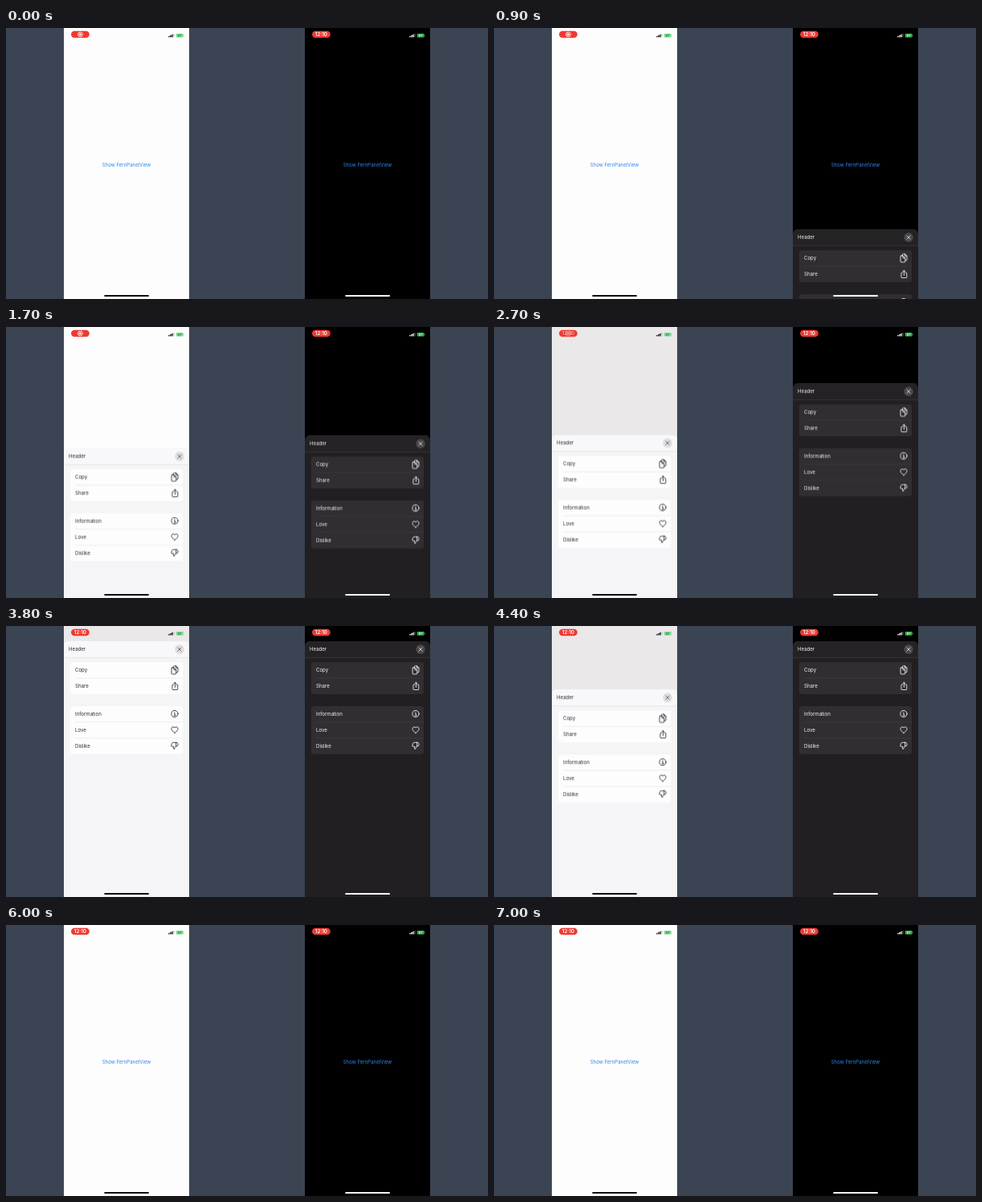
Write an HTML page that moves like this. It is 600 px wide and 338 px high and loops after 7100 ms.

```html
<!DOCTYPE html>
<html lang="en">
<head>
<meta charset="utf-8">
<title>Half-height sheet, light and dark</title>
<style>
  html, body { margin: 0; width: 100%; height: 100%; overflow: hidden; background: #3b4452; }
  svg { display: block; width: 600px; height: 338px; }
  text { font: 6.1px Inter, "Liberation Sans", sans-serif; fill: var(--text); }

  .light {
    --screen: #fefdfe; --ink: #0c0c0e; --text: #2b2b2e; --sheet: #f5f4f7; --header: #f8f7f9;
    --card: #fefdfe; --line: #dfdee2; --close: #dedde0; --cross: #65646a; --weak: #c4c4c8;
    --cell: #7ddc94; --charge: #23803c;
  }
  .dark {
    --screen: #000; --ink: #fff; --text: #f6f5f7; --sheet: #221f22; --header: #252225;
    --card: #302e32; --line: #434145; --close: #4a484c; --cross: #d2d1d4; --weak: #55555a;
    --cell: #38a94f; --charge: #d9f5df;
  }

  .screen { fill: var(--screen); }
  .sheet { fill: var(--sheet); }
  .header { fill: var(--header); }
  .card { fill: var(--card); }
  .rule { stroke: var(--line); stroke-width: .6; }
  .ink { fill: var(--ink); }
  .icon { fill: none; stroke: var(--text); stroke-width: .85; stroke-linecap: round; stroke-linejoin: round; }
  .button { fill: #2f86ec; text-anchor: middle; }
  .pill { fill: #ee3a33; }
  .clock { font-size: 6.2px; font-weight: 600; fill: #fff; text-anchor: middle; }

  .move, .dim, .clock.late, .rec, .press { animation: 7.1s linear infinite; }
  .light .move { animation-name: light-sheet; }
  .dark .move { animation-name: dark-sheet; }
  .dim { fill: #ebe8ea; animation-name: dim; }
  .clock.late { animation-name: appear; }
  .rec { animation-name: vanish; }
  .dark .press { animation-name: press-dark; }
  .light .press { animation-name: press-light; }

  @keyframes light-sheet {
    0% { transform: translateY(340px); }
    19.296% { transform: translateY(340px); animation-timing-function: ease; }
    26.338% { transform: translateY(135.4px); }
    37.465% { transform: translateY(135.4px); animation-timing-function: ease-in-out; }
    46.761% { transform: translateY(19px); }
    59.859% { transform: translateY(19px); animation-timing-function: ease; }
    66.901% { transform: translateY(135.4px); }
    83.169% { transform: translateY(135.4px); animation-timing-function: ease-in; }
    84.437%, 100% { transform: translateY(340px); }
  }
  @keyframes dark-sheet {
    0% { transform: translateY(340px); }
    10.845% { transform: translateY(340px); animation-timing-function: ease; }
    17.887% { transform: translateY(135.4px); }
    35.211% { transform: translateY(135.4px); animation-timing-function: ease; }
    43.944% { transform: translateY(19px); }
    76.197% { transform: translateY(19px); animation-timing-function: ease-in; }
    77.394%, 100% { transform: translateY(340px); }
  }
  @keyframes dim {
    0%, 24.225% { opacity: 0; }
    27.887%, 83.169% { opacity: 1; }
    84.437%, 100% { opacity: 0; }
  }
  @keyframes appear { 0%, 36.62% { opacity: 0; } 39.437%, 100% { opacity: 1; } }
  @keyframes vanish { 0%, 36.62% { opacity: 1; } 39.437%, 100% { opacity: 0; } }
  @keyframes press-dark {
    0%, 74.65% { opacity: 1; }
    75.6%, 77.394% { opacity: .45; }
    78%, 100% { opacity: 1; }
  }
  @keyframes press-light {
    0%, 81.7% { opacity: 1; }
    82.6%, 84.437% { opacity: .45; }
    85%, 100% { opacity: 1; }
  }
</style>
</head>
<body>
<svg viewBox="0 0 600 338" xmlns="http://www.w3.org/2000/svg">
  <defs>
    <clipPath id="frame"><rect x="72" width="156" height="338"/></clipPath>

    <g id="status">
      <rect class="pill" x="81" y="3.8" width="22.8" height="8.5" rx="4.25"/>
      <g class="ink">
        <rect x="202.2" y="9.9" width="1.4" height="1.7" rx=".3"/>
        <rect x="204.2" y="9.1" width="1.4" height="2.5" rx=".3"/>
        <rect x="206.2" y="8.1" width="1.4" height="3.5" rx=".3"/>
      </g>
      <rect x="208.2" y="7.1" width="1.4" height="4.5" rx=".3" fill="var(--weak)"/>
      <rect x="211.7" y="7" width="9" height="4.7" rx="1.3" fill="var(--cell)"/>
      <rect x="221.1" y="8.6" width=".7" height="1.6" rx=".3" fill="var(--weak)"/>
      <text x="216.2" y="10.7" text-anchor="middle" style="font-size:3.8px;font-weight:700;fill:var(--charge)">67</text>
    </g>

    <g id="home"><rect class="ink" x="122.2" y="333" width="55.8" height="2" rx="1"/></g>

    <g id="panel">
      <rect class="sheet" x="72" width="156" height="345" rx="6"/>
      <path class="header" d="M72 20.5V6a6 6 0 0 1 6-6H222a6 6 0 0 1 6 6V20.5z"/>
      <path class="rule" d="M72 20.5H228"/>
      <text x="78" y="12.3">Header</text>

      <rect class="card" x="79.7" y="26.3" width="140.4" height="39.7" rx="3"/>
      <rect class="card" x="79.7" y="81" width="140.4" height="59.8" rx="3"/>
      <path class="rule" d="M86 46.1H220.1M86 100.8H220.1M86 120.9H220.1"/>

      <text x="86" y="37.9">Copy</text>
      <text x="86" y="58">Share</text>
      <text x="86" y="92.5">Information</text>
      <text x="86" y="112.6">Love</text>
      <text x="86" y="132.7">Dislike</text>

      <g class="icon">
        <!-- two pages -->
        <path d="M208.4 32.9V31.6q0-.8.8-.8H211.6L214 33.2V38q0 .8-.8.8H212"/>
        <path d="M211.5 30.9V33.3H213.9"/>
        <path d="M206.8 33H209.1L211.8 35.7V40.2q0 .8-.8.8H206.8q-.8 0-.8-.8V33.8q0-.8.8-.8zM209 33.1V35.8H211.7"/>
        <!-- box with arrow -->
        <path d="M208.6 54.1H207.7q-.8 0-.8.8V59.7q0 .8.8.8H213q.8 0 .8-.8V54.9q0-.8-.8-.8H212.1M210.4 57.4V51.2M208.7 52.9L210.4 51.2L212.1 52.9"/>
        <!-- info -->
        <circle cx="210" cy="90.5" r="4.1"/>
        <path d="M209.3 89.9H210.2V92.6M209.2 92.7H211.2M210 88.2v.1"/>
        <!-- heart -->
        <path d="M210 114.4C207.5 112.6 206 110.9 206 109.2C206 107.7 207 106.8 208.1 106.8C209 106.8 209.7 107.3 210 108.1C210.3 107.3 211 106.8 211.9 106.8C213 106.8 214 107.7 214 109.2C214 110.9 212.5 112.6 210 114.4z"/>
        <!-- thumb down -->
        <path d="M211.6 126.3H208.2Q206.9 126.3 206.5 127.4L205.8 129.9Q205.5 131.3 206.8 131.3H208.9Q208.3 132.8 208.5 133.9Q208.8 134.8 209.6 134.4Q210 132.2 211.7 131V126.3M211.7 126.3H212.9Q214.1 127 214.1 128.7T212.9 131H211.7"/>
      </g>
    </g>

    <g id="close">
      <circle cx="216" cy="10.1" r="5.8" fill="var(--close)"/>
      <path class="press" d="M213.9 8L218.1 12.2M218.1 8L213.9 12.2" stroke="var(--cross)" stroke-width=".95" stroke-linecap="round"/>
    </g>
  </defs>

  <rect width="600" height="338" fill="#3b4452"/>

  <g class="light" clip-path="url(#frame)">
    <rect class="screen" x="72" width="156" height="338"/>
    <text class="button" x="150" y="173.1">Show FernPanelView</text>
    <rect class="dim" x="72" width="156" height="338"/>
    <g class="move">
      <use href="#panel"/>
      <circle cx="216" cy="10.1" r="5.8" fill="var(--close)"/>
      <path class="press" d="M213.9 8L218.1 12.2M218.1 8L213.9 12.2" stroke="var(--cross)" stroke-width=".95" stroke-linecap="round"/>
    </g>
    <use href="#status"/>
    <g class="rec">
      <circle cx="92.4" cy="8.05" r="2.9" fill="none" stroke="#fff" stroke-width=".9"/>
      <circle cx="92.4" cy="8.05" r="1.5" fill="#fff"/>
    </g>
    <text class="clock late" x="92.4" y="10.3">12:10</text>
    <use href="#home"/>
  </g>

  <g class="dark" transform="translate(300)" clip-path="url(#frame)">
    <rect class="screen" x="72" width="156" height="338"/>
    <text class="button" x="150" y="173.1">Show FernPanelView</text>
    <g class="move">
      <use href="#panel"/>
      <circle cx="216" cy="10.1" r="5.8" fill="var(--close)"/>
      <path class="press" d="M213.9 8L218.1 12.2M218.1 8L213.9 12.2" stroke="var(--cross)" stroke-width=".95" stroke-linecap="round"/>
    </g>
    <use href="#status"/>
    <text class="clock" x="92.4" y="10.3">12:10</text>
    <use href="#home"/>
  </g>
</svg>
</body>
</html>
```
